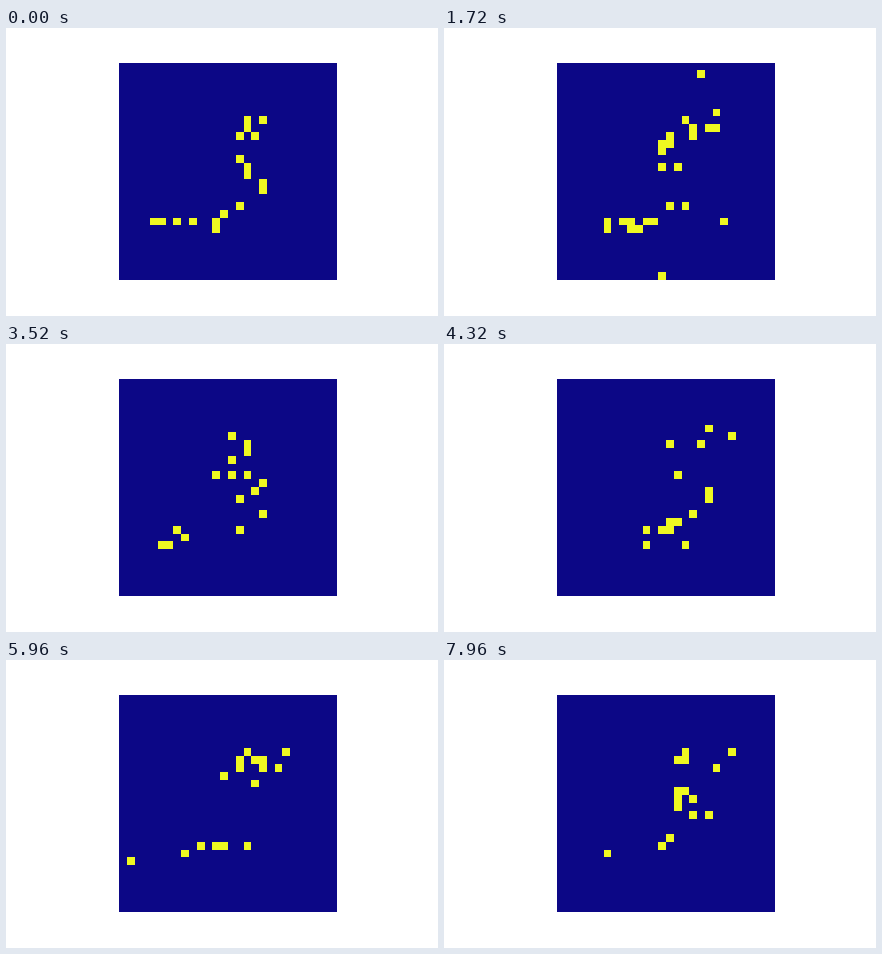
A matplotlib script that plays this animation: 432x288 px, repeating every 8000 ms.

```python
import numpy as np
import matplotlib.pyplot as plt
from matplotlib.animation import FuncAnimation

SIZE = 28
FRAMES = 200
INTERVAL = 40
PEAK, SPREAD, NOISE = 0.28, 0.75, 0.0016

# Corners of a handwritten five as column + row * 1j
PEN = [21.5 + 7.2j, 14.8 + 8j, 13.3 + 11.5j, 18 + 14.5j,
       16.7 + 17.7j, 10 + 20.3j, 4.5 + 20.3j]


def segment_distance(z, a, b):
    """Distance from every cell to the stroke a-b."""
    along = ((z - a) / (b - a)).real.clip(0, 1)
    return abs(z - a - along * (b - a))


def spike_rate():
    rows, cols = np.mgrid[:SIZE, :SIZE]
    z = cols + 1j * rows
    dist = np.min([segment_distance(z, a, b) for a, b in zip(PEN, PEN[1:])],
                  axis=0)
    return NOISE + PEAK * np.exp(-0.5 * (dist / SPREAD) ** 2)


# Each cell fires independently in every frame
rng = np.random.default_rng(0)
spikes = rng.random((FRAMES, SIZE, SIZE)) < spike_rate()

fig, ax = plt.subplots(figsize=(6, 4), dpi=72, facecolor="white")
fig.subplots_adjust(left=0.125, right=0.9, bottom=0.125, top=0.88)
ax.axis("off")
image = ax.imshow(spikes[0].astype(float), cmap="plasma", vmin=0, vmax=1,
                  interpolation="nearest")


def update(i):
    image.set_data(spikes[i].astype(float))
    return (image,)


anim = FuncAnimation(fig, update, frames=FRAMES, interval=INTERVAL,
                     repeat=True, repeat_delay=0)
plt.show()
```
